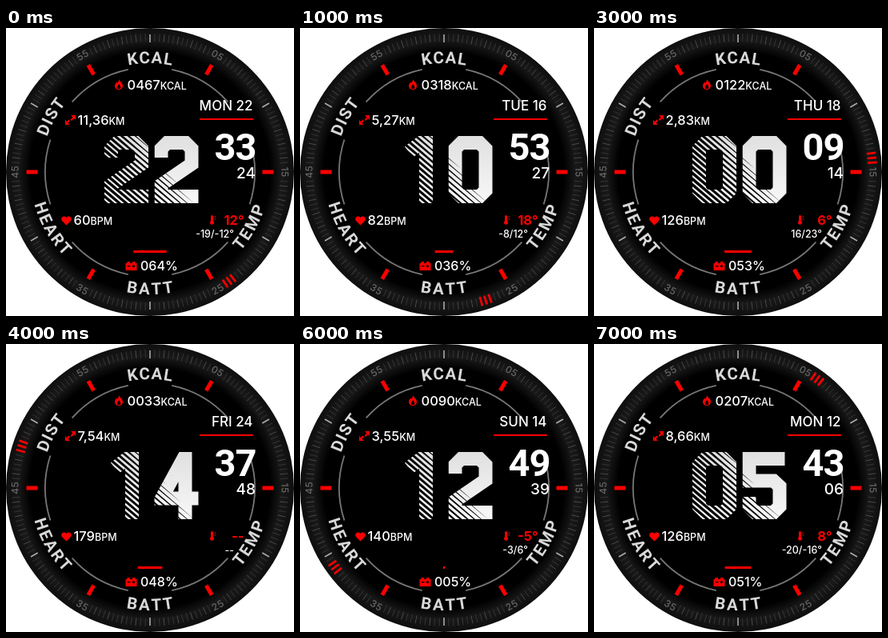
Animation, 360 px wide and 360 px high, one loop 8 s. Source, as an HTML page with a canvas:

```html
<!DOCTYPE html>
<html lang="en">
<head>
<meta charset="utf-8">
<title>Watch face</title>
<style>
html, body { margin: 0; width: 100%; height: 100%; overflow: hidden; background: #fff; }
canvas { display: block; width: 360px; height: 360px; }
</style>
</head>
<body>
<canvas id="face"></canvas>
<script>
const canvas = document.getElementById('face');
const ratio = window.devicePixelRatio || 1;
canvas.width = canvas.height = 360 * ratio;
const ctx = canvas.getContext('2d');
ctx.scale(ratio, ratio);

const RED = '#f00', WHITE = '#fff', C = 180;
const rad = deg => deg * Math.PI / 180;
const sans = (size, weight = 500) => `${weight} ${size}px Inter, sans-serif`;

// One reading per second:
// date, hour, minute, second, kcal, km, pulse, battery, temperature, range
const readings = [
  ['MON 22', '22', '33', 24, '0467', '11,36', '60', 64, '12°', '-19/-12°'],
  ['TUE 16', '10', '53', 27, '0318', '5,27', '82', 36, '18°', '-8/12°'],
  ['WED 20', '15', '35', 49, '0244', '9,49', '96', 27, '27°', '-15/-12°'],
  ['THU 18', '00', '09', 14, '0122', '2,83', '126', 53, '6°', '16/23°'],
  ['FRI 24', '14', '37', 48, '0033', '7,54', '179', 48, '--', '--'],
  ['SAT 20', '21', '29', 43, '0156', '6,38', '108', 32, '9°', '-7/10°'],
  ['SUN 14', '12', '49', 39, '0090', '3,55', '140', 5, '-5°', '-3/6°'],
  ['MON 12', '05', '43', 6, '0207', '8,66', '126', 51, '8°', '-20/-16°']
];

// Centre lines of the big hour digits in a 55 x 84 cell
const digits = {
  0: 'M16 8.5H39L46.5 16V68L39 75.5H16L8.5 68V16Z',
  1: 'M34.5 84V8.5H28L13 20',
  2: 'M8.5 27V16L16 8.5H39L46.5 16V35L8.5 61V75.5H55',
  4: 'M38.5 84V4L9 58H55',
  5: 'M53 8.5H8.5V36H39L46.5 43V68L39 75.5H16L8.5 68V56'
};

function text(str, x, y, font, color = WHITE, align = 'left') {
  ctx.font = font;
  ctx.fillStyle = color;
  ctx.textAlign = align;
  ctx.fillText(str, x, y);
  return x + ctx.measureText(str).width;
}

function value(number, unit, x, y) {
  const end = text(number, x, y, sans(16.5));
  text(unit, end, y, sans(12.5));
}

function box(x, y, w, h, color = RED) {
  ctx.fillStyle = color;
  ctx.fillRect(x, y, w, h);
}

function shape(path, x, y, color = RED) {
  ctx.save();
  ctx.translate(x, y);
  ctx.fillStyle = color;
  ctx.fill(new Path2D(path));
  ctx.restore();
}

function spoke(deg, r1, r2, width, color) {
  const s = Math.sin(rad(deg)), c = Math.cos(rad(deg));
  ctx.strokeStyle = color;
  ctx.lineWidth = width;
  ctx.beginPath();
  ctx.moveTo(C + s * r1, C - c * r1);
  ctx.lineTo(C + s * r2, C - c * r2);
  ctx.stroke();
}

// Text bent along a circle, kept readable in the lower half
function rimText(str, deg, r, font, color, gap) {
  const low = deg > 90 && deg < 270;
  ctx.font = font;
  const widths = [...str].map(ch => ctx.measureText(ch).width + gap);
  let pos = -widths.reduce((a, b) => a + b) / 2;
  ctx.textBaseline = 'middle';
  [...str].forEach((ch, i) => {
    const turn = (pos + widths[i] / 2) / r;
    pos += widths[i];
    ctx.save();
    ctx.translate(C, C);
    ctx.rotate(rad(low ? deg - 180 : deg) + (low ? -turn : turn));
    text(ch, 0, (low ? r : -r) + 1, font, color, 'center');
    ctx.restore();
  });
  ctx.textBaseline = 'alphabetic';
}

function dial() {
  ctx.fillStyle = WHITE;
  ctx.fillRect(0, 0, 360, 360);
  const rim = ctx.createRadialGradient(C, C, 150, C, C, 180);
  rim.addColorStop(0, '#000');
  rim.addColorStop(0.5, '#191919');
  rim.addColorStop(1, '#0e0e0e');
  ctx.fillStyle = rim;
  ctx.beginPath();
  ctx.arc(C, C, 180, 0, 7);
  ctx.fill();

  for (let a = 0; a < 360; a += 2) {
    const fromLabel = Math.abs(a % 60 - 30);
    if (a % 60 === 0) spoke(a, 162, 172, 1.6, '#aaa');
    else if (fromLabel > 3) spoke(a, 163, 173, 0.9, a % 6 ? '#383838' : '#505050');
  }
  for (let a = 30; a < 360; a += 60) {
    rimText(String(a / 6).padStart(2, '0'), a, 169, sans(12), '#666', 0.5);
    ctx.strokeStyle = '#777';
    ctx.lineWidth = 1.8;
    ctx.beginPath();
    ctx.arc(C, C, 131, rad(a - 108), rad(a - 72));
    ctx.stroke();
    spoke(a, 140.5, 154.5, 5, RED);
  }
  const words = { KCAL: 0, TEMP: 119, BATT: 180, HEART: 240, DIST: 299 };
  for (const [word, deg] of Object.entries(words))
    rimText(word, deg, deg === 180 ? 146 : 143, 'bold 20.5px Roboto, sans-serif', '#d8d8d8', 1.8);
}

function icons() {
  shape('M5 0C6 3 10 4 10 8.5C10 11 8 13 5 13C2 13 0 11 0 8.5C0 6 1.5 5.5 2 3.5L3.2 5C4.5 3.5 5 2 5 0Z', 136, 64);
  shape('M3 0C4 2 5 3 5 4.5C5 6.5 0.500 6.500 0.500 4.500C0.500 3 2 2 3 0Z', 138.3, 70, '#000');
  shape('M6.5 11.5L1 6C-1.5 2.5 3 -2 6.5 2C10 -2 14.5 2.5 12 6Z', 69, 235);
  shape('M7 0H13V6L11 4L8 7L6.5 5.5L9.5 2.5ZM6 12H0V6L2 8L4.5 5.5L6 7L3.5 9.5Z', 74, 109);
  shape('M2 0H5.5V2H8.5V0H12V2H14V11H0V2H2Z', 149.5, 292);
  box(151.5, 297, 4, 1.3, '#000');
  box(157.5, 297, 4, 1.3, '#000');
  box(158.8, 295.7, 1.3, 4, '#000');
  shape('M3 1Q4.5 -1 6 1V7Q8 9 6.5 11Q4.5 12.5 2.5 11Q1 9 3 7Z', 253, 234);
  box(260.5, 235.5, 2, 1);
  box(260.5, 238.5, 2, 1);
}

function hours(hour) {
  ctx.save();
  ctx.translate(123, 135);
  const shade = ctx.createLinearGradient(0, 0, 0, 84);
  shade.addColorStop(0, '#e0e0e0');
  shade.addColorStop(1, '#f8f8f8');
  [...hour].forEach((digit, i) => {
    ctx.save();
    ctx.translate(i * 62.5, 0);
    ctx.beginPath();
    ctx.rect(0, 0, 55.5, 84);
    ctx.clip();
    ctx.strokeStyle = shade;
    ctx.lineWidth = 17;
    ctx.stroke(new Path2D(digits[digit]));
    ctx.restore();
  });
  // Slanted cuts that taper away to the upper right
  ctx.beginPath();
  ctx.rect(0, 0, 118, 84);
  ctx.clip();
  ctx.fillStyle = '#000';
  for (let y = -40; y < 84; y += 7.2) {
    const tip = 140 + 2.4 * y;
    ctx.beginPath();
    ctx.moveTo(0, y - 2.3);
    ctx.lineTo(tip, y + tip * 0.85);
    ctx.lineTo(0, y + 2.3);
    ctx.fill();
  }
  ctx.restore();
}

function draw([date, hour, minute, second, kcal, km, pulse, battery, temp, range]) {
  dial();
  for (const offset of [-2, 0, 2]) spoke(second * 6 + offset, 162.5, 174, 2.7, RED);
  hours(hour);
  icons();
  value(kcal, 'KCAL', 151.5, 77);
  value(km, 'KM', 89.5, 121);
  value(pulse, 'BPM', 84.5, 246);
  text(String(battery).padStart(3, '0') + '%', 168, 303, sans(16));
  const width = battery * 0.66 - 1;
  box(C - width / 2, 278, width, 3);

  text(date, 308.5, 102.5, sans(17), WHITE, 'right');
  box(242, 113, 67, 2);
  ctx.letterSpacing = '-1px';
  text(minute, 312.5, 165, 'bold 47px Roboto, sans-serif', WHITE, 'right');
  ctx.letterSpacing = '0px';
  text(String(second).padStart(2, '0'), 312, 188, sans(19), WHITE, 'right');
  text(temp, 297.5, 246, sans(16.5, 700), RED, 'right');
  text(range, 285, 262, sans(12.5), WHITE, 'right');
}

const start = performance.now();
function tick() {
  const elapsed = Math.max(0, performance.now() - start);
  draw(readings[Math.floor(elapsed / 1000) % readings.length]);
  requestAnimationFrame(tick);
}
tick();
</script>
</body>
</html>
```
